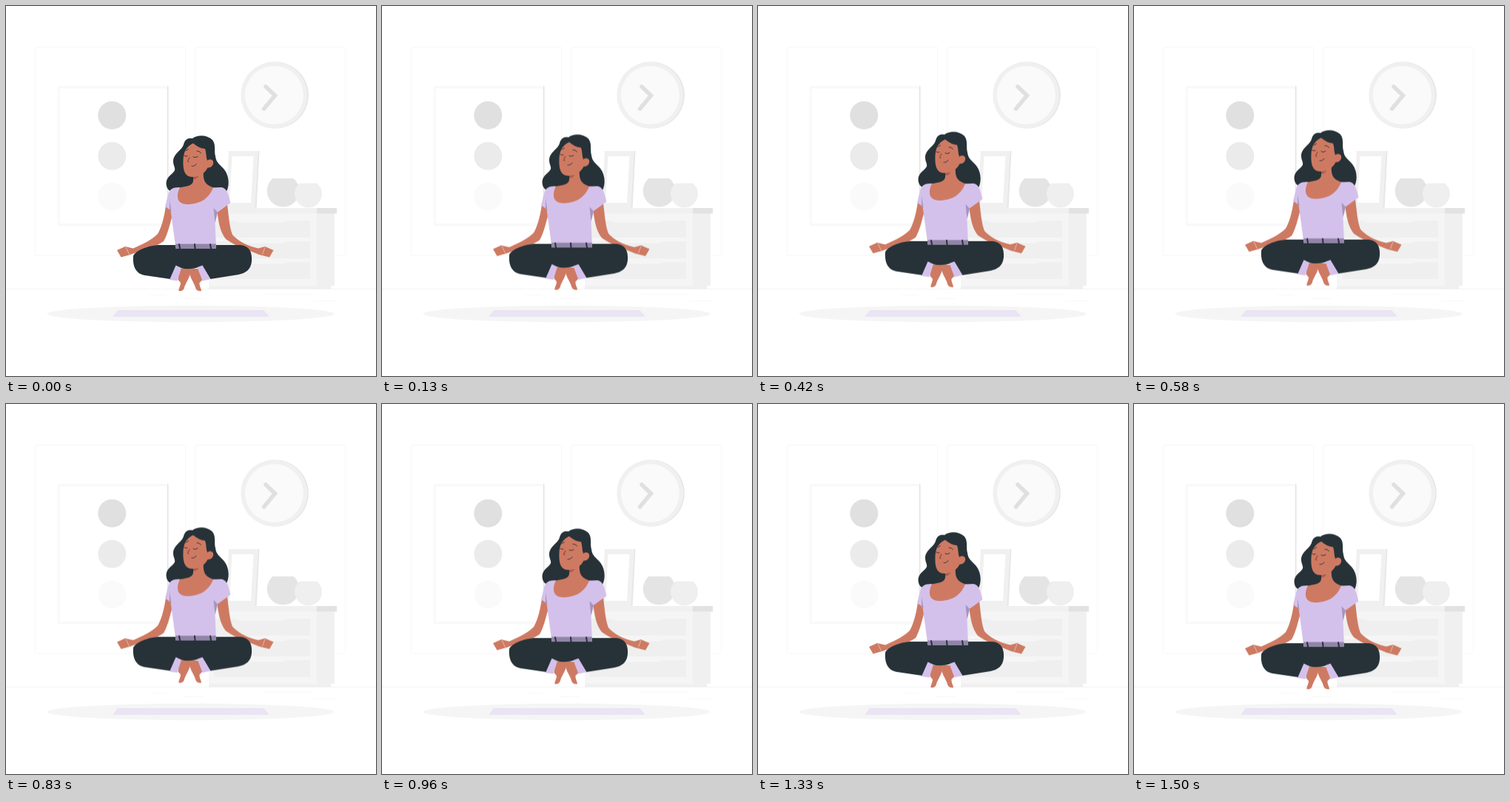
An HTML page without scripts for the animation above (1.54 s loop, 500 by 500 pixels).

```html
<!DOCTYPE html>
<html lang="en">
<head>
<meta charset="utf-8">
<title>Floating meditation</title>
<style>
  html, body { margin: 0; width: 100%; height: 100%; overflow: hidden; background: #fff; }
  svg { display: block; width: 100vw; height: 100vh; }
  .skin { fill: #ce7a63; }
  .dark { fill: #263238; }
  .lilac { fill: #d4c1eb; }
  .line { fill: none; stroke: #263238; stroke-width: .9; stroke-linecap: round; }
  .crease { fill: none; stroke: #f0d5cb; stroke-width: .7; }
  .woman { animation: float 1540ms infinite; }
  /* steady rise and fall, about 24 positions a second */
  @keyframes float {
    0% { transform: translateY(0); animation-timing-function: steps(18); }
    47.4% { transform: translateY(-9.5px); animation-timing-function: steps(18); }
    97.3%, 100% { transform: translateY(.25px); }
  }
</style>
</head>
<body>
<svg viewBox="0 0 500 500">
  <defs>
    <g id="drawer">
      <path fill="#efefef" d="M281 290H411V313H281Z"/>
      <path fill="#f5f5f5" d="M309 290H381L376 292.5H314Z"/>
    </g>
  </defs>

  <g class="room">
    <g fill="none" stroke="#f8f8f8">
      <rect x="39.5" y="55.500" width="203" height="282" rx="2"/>
      <rect x="255.500" y="55.500" width="203" height="282" rx="2"/>
    </g>
    <path stroke="#f2f2f2" stroke-width=".8" d="M0 382.500H500"/>
    <path stroke="#f5f5f5" stroke-width=".7" d="M195 390.500H216M240 395.500H266M350 389.500H415M416 398.500H448"/>

    <path fill="#e4e4e4" d="M217 108H219.500V297H217Z"/>
    <path fill="#f9f9f9" d="M69.500 108H218V297.500H69.500Z"/>
    <path fill="#fff" d="M73 111.500H217V293.500H73Z"/>
    <circle cx="143.300" cy="147.800" r="19" fill="#e0e0e0"/>
    <circle cx="143.300" cy="202.700" r="19" fill="#ebebeb"/>
    <circle cx="143.300" cy="257.500" r="19" fill="#fafafa"/>

    <circle cx="363.800" cy="120.500" r="45" fill="#e4e4e4"/>
    <circle cx="362.400" cy="120.500" r="45" fill="#f0f0f0"/>
    <circle cx="362.400" cy="120.500" r="39.500" fill="#fafafa"/>
    <path fill="none" stroke="#e0e0e0" stroke-width="5.500" stroke-linecap="round" d="M351 109L363.500 121L348.500 139"/>

    <path fill="#e6e6e6" d="M336 196H342.500L338.500 273H332Z"/>
    <path fill="#f0f0f0" d="M301 196H341L336.500 273H297Z"/>
    <path fill="#fff" d="M305.500 203H334.500L331 266H302Z"/>

    <path fill="#e4e4e4" d="M360.500 233H388.500A21.800 21.800 0 1 1 360.500 233Z"/>
    <path fill="#efefef" d="M397 239.500H420A18.500 18.500 0 1 1 397 239.500Z"/>

    <path fill="#f5f5f5" d="M274 280H420V378H274Z"/>
    <path fill="#f0f0f0" d="M420 280H444V378H420ZM274 378H439V382.500H274ZM269 273H420V280.500H269Z"/>
    <path fill="#e2e2e2" d="M420 273H447V280.500H420Z"/>
    <use href="#drawer"/>
    <use href="#drawer" y="28"/>
    <use href="#drawer" y="56"/>

    <ellipse cx="249.500" cy="416" rx="194" ry="11.200" fill="#f5f5f5"/>
    <path fill="#eae4f4" d="M151 411H348.500L356 420H144Z"/>
  </g>

  <g class="woman">
    <path class="dark" d="M252 179C246 178 242 180 240 187C238 195 226 199 226 210C226 216 229 218 228 222C226 227 217 230 216.500 239C216.500 245 219 249 223 250.500H298C302 243 302 230 295 221C289 214 284 212 283 203C281 196 284 187 279 181C272 174 259 173.500 252 179Z"/>

    <path class="skin" d="M253 226L267 222C266 235 268 243 284 246L276 272H230L231 246C243 244 253 243 253 236Z"/>
    <path fill="#a85b49" d="M253 230L260.500 230Q257 234 253 234.500Z"/>
    <path class="skin" d="M253 185.500C245 189 240 196 239.500 207C239 219 240 231 252 231C263 231 269 225 272.500 218.500C278 219 281 214 280 210C278 206 274 207 272 209C270 204 271 198 269 193Q260 192 253 185.500Z"/>
    <path class="line" d="M240.500 202Q242.500 203.800 245 202.800M253 204Q256 206 259 203.500M243 195.500L246.500 193.500M258 196Q261 195.500 263.500 198.500M251 216.500Q255 217 257 213.500"/>
    <path fill="none" stroke="#9b4a3c" stroke-width="1.300" d="M248 204.500L245.500 210L247.500 211"/>

    <path class="skin" d="M216 270C213 290 209 301 205 308C196 317 182 323 172 327.500L161 325L150 330L155.500 339.500L168 336C185 330 202 326 213 318C219 308 222 292 226 279Z"/>
    <path class="skin" d="M285 275C287 291 289 305 297 315C311 325 328 330 342 336L356 339.500L361.500 330L350 325L341 327.500C325 324 313 317 306 309C302 299 301 284 299 268Z"/>
    <path class="crease" d="M162 326L166.500 335.500M350 326L346.500 335.500"/>

    <path class="skin" d="M234 355H249V361C248 368 242 375 240.500 382Q238 386 233.500 385C233 382 236 378 236 374L232.500 370Z"/>
    <path class="skin" d="M263.500 355H248V361C249 368 255 375 256.500 382Q259 386 264 385C264 382 261 378 261.500 374L265.500 370Z"/>

    <path class="dark" d="M205 323H317C329 324 333 333 332 345C331 356 324 361 314 363L276 369L261 353Q248 357 235 354L222 369L188 364C175 362 171 351 172 338C174 332 187 325 205 323Z"/>
    <path class="lilac" d="M229.500 350.500L237 354L231.500 371.500L221 370ZM258.500 353L265.500 350.500L276.500 369L265.500 371.500Z"/>

    <path class="lilac" d="M235 245C224 245 221 248 219 255L215 271L222.500 276L229.500 328H284L282.500 292L285.500 279L303.500 266C301 256 299 246 291 245L280 245.500C275 258 265 268 244 268C230 267 230 256 235 245Z"/>
    <path fill="#a594bf" d="M280.500 273L286 279L282.500 293ZM221 262L223.500 278L221 275Z"/>
    <path fill="#9184a8" d="M229 321.500H283.800L284 328H229.500Z"/>
    <path class="line" style="stroke-width:2" d="M234 322L235 327.500M255 322L255.500 327.500M276 322L277 327.500"/>
  </g>
</svg>
</body>
</html>
```
